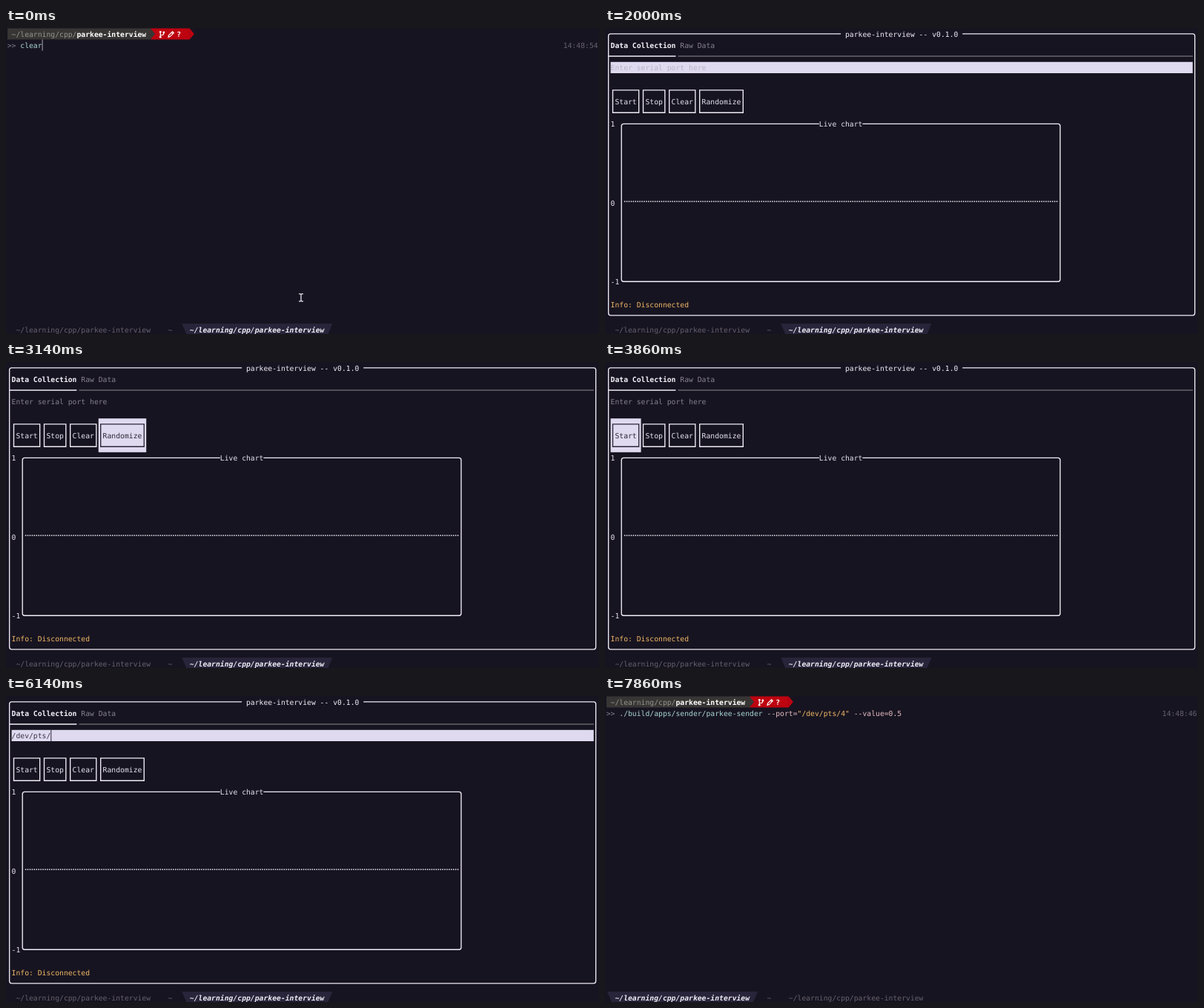
Write an HTML page with a canvas that moves like this. It is 800 px wide and 413 px high and loops after 8 s.

```html
<!DOCTYPE html>
<html lang="en">
<head>
<meta charset="utf-8">
<title>Terminal session</title>
<style>
  html, body { margin: 0; width: 100%; height: 100%; overflow: hidden; background: #171421; }
  canvas { display: block; }
</style>
</head>
<body>
<canvas id="stage" width="800" height="413"></canvas>
<script>
const ctx = document.getElementById('stage').getContext('2d');
const LOOP = 8000, CW = 5.86, RH = 15.2, X0 = 1.7;
const BG = '#171421', FG = '#e6e2f0', LINE = '#f0edf6', LILAC = '#e0daf0',
      DARK = '#2b2738', DIM = '#85828c', FAINT = '#65626c', GOLD = '#f0b866',
      CYAN = '#a9d6d6', ROSE = '#e6bfc2', RED = '#bd0410';
const PATH = '~/learning/cpp/';
const PROJECT = 'parkee-interview';

// Terminal grid: left edge of a column, centres of a column and a row
const cx = c => X0 + c * CW;
const mx = c => cx(c + .5);
const my = r => (r + .5) * RH + .2;

function text(s, col, row, color = FG, style = '') {
  ctx.font = `${style} 9.73px "DejaVu Sans Mono", monospace`;
  ctx.fillStyle = color;
  [...s].forEach((ch, i) => ctx.fillText(ch, cx(col + i), my(row) + 3.9));
}

function fill(x, y, w, h, color) {
  ctx.fillStyle = color;
  ctx.fillRect(x, y, w, h);
}

function cells(col, row, cols, rows, color) {
  fill(cx(col), row * RH + .2, cols * CW, rows * RH, color);
}

function poly(points, color) {
  ctx.fillStyle = color;
  ctx.beginPath();
  points.forEach(p => ctx.lineTo(...p));
  ctx.fill();
}

function frame(c1, r1, c2, r2, radius = 0, color = LINE) {
  ctx.strokeStyle = color;
  ctx.lineWidth = 1.35;
  ctx.beginPath();
  ctx.roundRect(mx(c1), my(r1), mx(c2) - mx(c1), my(r2) - my(r1), radius);
  ctx.stroke();
}

function caret(col, row, color) {
  fill(cx(col), row * RH + .3, 1, RH, color);
}

function mouse() {
  ctx.strokeStyle = '#e8e6ee';
  ctx.lineWidth = 1.3;
  ctx.stroke(new Path2D('M395 358.8h2l1 1 1-1h2M398 359.5v8.5M395 368.8h2l1-1 1 1h2'));
}

function tabBar(active) {
  [[2, PATH + PROJECT], [37, '~'], [42, PATH + PROJECT]].forEach(([col, label], i) => {
    const on = i === active, left = cx(col) - 10.5, right = cx(col + label.length) + 11;
    if (on) poly([[left, 399], [right, 399], [right - 6, 413], [left + 6, 413]], '#28243a');
    text(label, col, 26.27, on ? '#efedf5' : FAINT, on ? 'italic bold' : '');
  });
}

function icons() {
  ctx.strokeStyle = ctx.fillStyle = '#fff';
  ctx.lineWidth = 1.2;
  ctx.stroke(new Path2D('M208.3 5.5v6.5M208.3 9.5h2.5q2 0 2-3'));
  for (const [x, y] of [[208.3, 5.3], [208.3, 12.2], [212.8, 6]]) {
    ctx.beginPath();
    ctx.arc(x, y, 1.4, 0, 7);
    ctx.fill();
  }
  ctx.stroke(new Path2D('M219 12.4l.6-2.6 5-5 1.8 1.8-5 5zM223.4 6l1.8 1.8'));
  text('?', 39, 0, '#fff', 'bold');
}

function shell(parts, clock, cursor) {
  const tip = x => [[x, .5], [x + 6, 8], [x, 15.5]];
  fill(cx(33), .5, 9 * CW, 15, RED);
  poly(tip(cx(42)), RED);
  fill(2, .5, cx(33) - 2, 15, '#383634');
  poly(tip(cx(33)), '#383634');
  text(PATH, 1, 0, '#96928e');
  text(PROJECT, 16, 0, '#fff', 'bold');
  icons();
  text('>>', 0, 1, DIM);
  text(clock, 128, 1, FAINT);
  let col = 3;
  for (const [s, color] of parts) {
    text(s, col, 1, color);
    col += s.length;
  }
  if (cursor) caret(col, 1, '#aaa6b4');
}

const BUTTONS = [['Start', 1], ['Stop', 8], ['Clear', 14], ['Randomize', 21]];

function app(focus, typed, info) {
  frame(0, 0, 135, 25, 3);
  cells(54, 0, 28, 1, BG);
  text(PROJECT + ' -- v0.1.0', 55, 0, LINE);

  const onTab = focus === 'tab', onInput = focus === 'input';
  if (onTab) cells(1, 1, 15, 1, LILAC);
  text('Data Collection', 1, 1, onTab ? DARK : '#f4f2fa', onTab ? '' : 'bold');
  text('Raw Data', 17, 1, DIM);
  fill(5, 37.3, cx(16) - 5, 1.5, LINE);
  fill(98.5, 37.3, 694.5, 1.5, '#66636c');

  if (onInput) cells(1, 3, 134, 1, LILAC);
  if (typed) text(typed, 1, 3, onInput ? '#3a3546' : FG);
  else text('Enter serial port here', 1, 3, onInput ? '#b9b4c6' : DIM);
  if (onInput && typed) caret(1 + typed.length, 3, DARK);

  for (const [label, col] of BUTTONS) {
    const on = focus === label, width = label.length + 2;
    if (on) cells(col, 5, width, 3, LILAC);
    frame(col, 5, col + width - 1, 7, 0, on ? DARK : LINE);
    text(label, col + 1, 6, on ? DARK : FG);
  }

  frame(3, 8, 104, 22, 3);
  cells(49, 8, 10, 1, BG);
  text('Live chart', 49, 8);
  text('1', 1, 8);
  text('0', 1, 15);
  text('-1', 1, 22);
  for (let i = 0; i < 200; i++) fill(cx(4.25 + i / 2) - .75, 233.4, 1.5, 1.5, LINE);

  text('Info: ' + info, 1, 24, GOLD);
}

const RUN = [['./build/apps/interview/' + PROJECT, CYAN]];
const SEND = [['./build/apps/sender/parkee-sender ', CYAN], ['--port=', ROSE],
              ['"/dev/pts/4"', GOLD], [' --value=0.5', ROSE]];

// Each track is a list of [start time, value]
const at = (track, t) => track.reduce((v, [start, next]) => t >= start ? next : v, undefined);
const LAUNCH = [[0, [['clear', CYAN]]], [140, []], [290, [['clear', CYAN]]], [430, RUN]];
const FOCUS = [[0, 'tab'], [2000, 'input'], [2430, 'Start'], [2710, 'Stop'], [2860, 'Clear'],
               [3140, 'Randomize'], [3430, 'Clear'], [3570, 'Stop'], [3860, 'Start'], [4000, 'input']];
const PORT = '/dev/pts/3';
const TYPED = [[0, 0], [4140, 1], [4290, 2], [4430, 3], [4710, 4], [5000, 5],
               [5290, 6], [5430, 8], [6000, 9], [6290, 10]];

function draw(t) {
  fill(0, 0, 800, 413, BG);
  if (t < 860) shell(at(LAUNCH, t), t < 140 ? '14:48:54' : '14:48:55', true);
  else if (t < 7430) {
    app(at(FOCUS, t), PORT.slice(0, at(TYPED, t)),
        t < 6710 ? 'Disconnected' : 'Connected to ' + PORT);
  } else shell(SEND, '14:48:46', t < 7860);
  tabBar(t < 7430 ? 2 : 0);
  if (t < 1290) mouse();
}

ctx.textRendering = 'geometricPrecision';
const begin = performance.now();
function tick() {
  draw((performance.now() - begin) % LOOP);
  requestAnimationFrame(tick);
}
tick();
</script>
</body>
</html>
```
